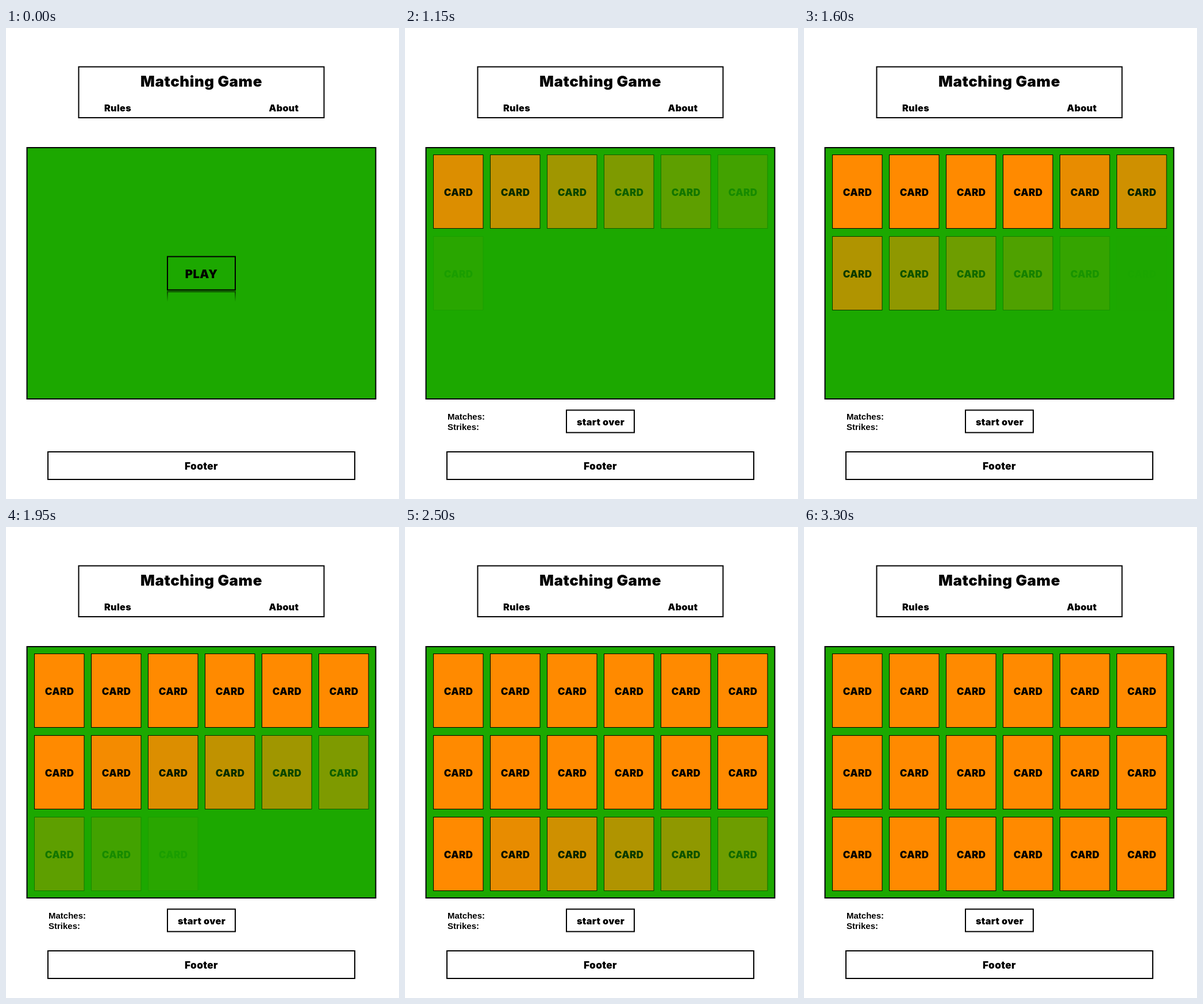
Write an HTML page that moves like this. It is 684x819 px and loops after 4250 ms.

```html
<!DOCTYPE html>
<html lang="en">
<head>
<meta charset="utf-8">
<title>Matching Game</title>
<style>
  html, body { margin: 0; width: 100%; height: 100%; overflow: hidden; background: #fff; }
  svg { display: block; width: 684px; height: 819px; }
  rect { fill: none; stroke: #000; stroke-width: 2; }
  text { font: 900 17px Inter, Roboto, sans-serif; letter-spacing: .02em; text-anchor: middle; }
  .score text { font: bold 15px "Liberation Sans", Arial, sans-serif; letter-spacing: 0; text-anchor: start; }
  .board { fill: #1ca800; }
  .card rect { fill: #ff8a00; stroke-width: 1; }
</style>
</head>
<body>
<svg viewBox="0 0 684 819">
  <defs>
    <linearGradient id="fade" gradientUnits="userSpaceOnUse" x1="0" y1="458" x2="0" y2="476">
      <stop offset="0" stop-opacity=".6"/>
      <stop offset="1" stop-opacity="0"/>
    </linearGradient>
  </defs>
  <rect x="126.5" y="67.5" width="427" height="88.5"/>
  <text x="340" y="102" style="font-size:26px">Matching Game</text>
  <text x="194.5" y="144.5" style="font-size:16.2px">Rules</text>
  <text x="483.5" y="144.5" style="font-size:16.2px">About</text>
  <rect class="board" x="36.5" y="208" width="607" height="437"/>
  <g id="cards"></g>
  <g id="play">
    <rect x="281" y="397.5" width="118" height="58"/>
    <path d="M281 476V458.5H399V476" fill="none" stroke="url(#fade)" stroke-width="2"/>
    <text x="340" y="435" style="font-size:20.3px">PLAY</text>
  </g>
  <g id="status">
    <g class="score">
      <text x="74" y="680.5">Matches:</text>
      <text x="74" y="698.5">Strikes:</text>
    </g>
    <rect x="281" y="664.5" width="118" height="39"/>
    <text x="340.5" y="691" style="font-size:16.3px">start over</text>
  </g>
  <rect x="73" y="737" width="534" height="48"/>
  <text x="340" y="768" style="font-size:17.2px">Footer</text>
</svg>
<script>
  const LOOP = 4250, STEP = 50, CUT = 350, FADE = 800;
  const [cardLayer, play, status] = ["cards", "play", "status"].map(id => document.getElementById(id));

  cardLayer.innerHTML = Array.from({ length: 18 }, (_, i) =>
    `<g class="card" transform="translate(${49.5 + i % 6 * 99} ${220.5 + Math.floor(i / 6) * 142})">
      <rect width="86.5" height="128"/><text x="43.5" y="71.5">CARD</text></g>`).join("");
  const cards = [...cardLayer.children];

  // Dissolve with slightly softened ends
  function opacity(t, start) {
    const x = Math.min(1, Math.max(0, (t - start) / FADE));
    return x - 0.2 * Math.sin(2 * Math.PI * x) / (2 * Math.PI);
  }

  function draw(t) {
    play.style.opacity = t < CUT ? 1 : 0;
    status.style.opacity = t < CUT ? 0 : opacity(t, 315);
    cards.forEach((card, i) => card.style.opacity = opacity(t, 495 + i * 100));
  }

  const origin = performance.now();
  function tick() {
    const t = (performance.now() - origin) % LOOP;
    draw(Math.floor(t / STEP) * STEP);
    requestAnimationFrame(tick);
  }
  tick();
</script>
</body>
</html>
```
